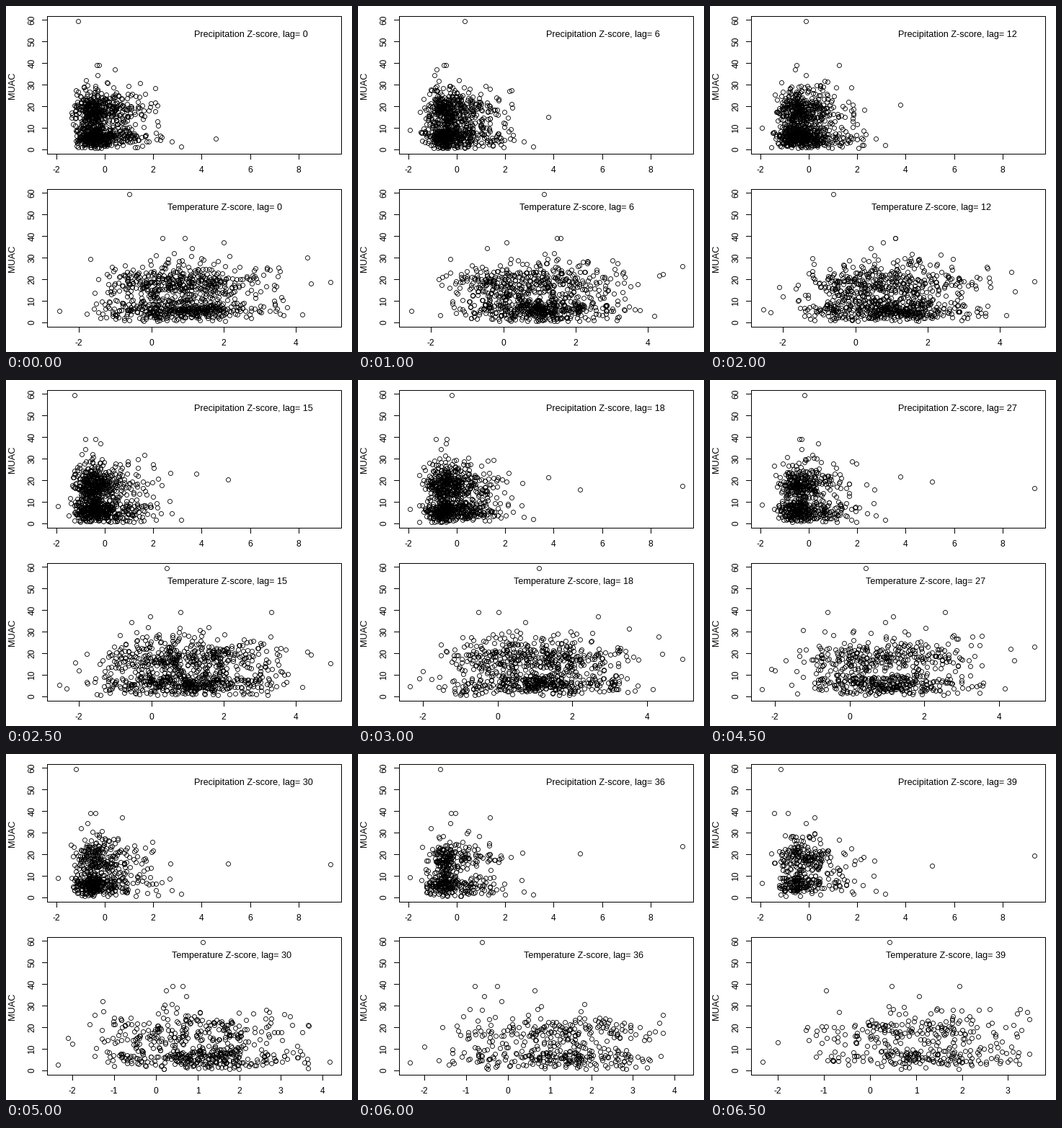
These frames come from a looping animation (480x480 px, 7000 ms). A matplotlib script:

```python
import numpy as np
import matplotlib.pyplot as plt
from matplotlib.animation import FuncAnimation

plt.rcParams["font.family"] = "Liberation Sans"
PX = 0.9                      # points per pixel at 80 dpi
LEFT, RIGHT, TOP, BOTTOM = 57, 465, 14, 205
INNER = (72.4, 450.2)         # pixel span of the x data range
SHIFT = 240                   # distance between the two panels
HIGH = [59.5, 39, 39, 37, 34.5]

# Isolated z-scores: x, typical MUAC, first lag, last lag
RAIN_FAR = [(-1.93, 9, 6, 39), (2.68, 8, 15, 39), (2.7, 19, 15, 39),
            (2.76, 4, 0, 39), (3.17, 1.5, 0, 39), (3.77, 20, 6, 27),
            (4.57, 5, 0, 3), (5.1, 19, 15, 39), (9.3, 18, 18, 39)]
TEMP_FAR = [(-2.55, 5, 0, 15), (-2.34, 4, 12, 39), (-2.1, 13, 12, 33),
            (-2.0, 12, 12, 39), (4.17, 4, 0, 33), (4.32, 24, 0, 27),
            (4.42, 19, 0, 27), (4.95, 20, 0, 27)]

fig = plt.figure(figsize=(6, 6), dpi=80, facecolor="white")
ax = fig.add_axes([0, 0, 1, 1])


def temp_range(lag):
    if lag < 18:
        return -2.59, 4.95
    if lag < 30:
        return -2.35, 4.95
    return (-2.35, 4.18) if lag < 39 else (-2.35, 3.57)


def to_x(v, lims):
    lo, hi = lims
    x = INNER[0] + (np.asarray(v) - lo) / (hi - lo) * (INNER[1] - INNER[0])
    return np.floor(x)


def to_y(v):
    return np.floor(199.4 - 2.993 * np.asarray(v))


def refill(rng, x, lo, hi, a, b):
    """Redraw values outside lo..hi evenly between a and b."""
    return np.where((x < lo) | (x > hi), rng.uniform(a, b, len(x)), x)


def muac(rng, n):
    kind = rng.random(n)
    low = 0.5 + np.abs(rng.normal(5.4, 2.7, n))
    mid = rng.normal(17.5, 3.6, n)
    wide = rng.triangular(9, 18, 33, n)
    return np.where(kind < 0.53, low, np.where(kind < 0.8, mid, wide))


def rain(rng, n):
    core = rng.normal(-0.5, 0.27, n)
    skew = -1.75 + rng.gamma(4.5, 0.4, n)
    x = np.where(rng.random(n) < 0.3, core, skew)
    return refill(rng, x, -1.6, 2.4, -0.9, 1.4)


def temp(rng, y, lag):
    n = len(y)
    core = np.where(y < 10, rng.normal(1.05, 0.45, n), rng.normal(0.85, 0.7, n))
    cool = rng.normal(-0.25, 0.65, n)
    warm = rng.triangular(1.2, 1.7, 4, n)
    kind = rng.random(n)
    cut = 0.8 - 0.003 * lag
    x = np.where(kind < 0.47, core, np.where(kind < cut, cool, warm))
    return refill(rng, x, -1.8, 3.8 if lag < 39 else 3.5, -1.0, 2.0)


def season(lag):
    """Temperature of the highest reading follows the yearly cycle."""
    t = 2 * np.pi * lag / 12
    return 0.25 - 0.87 * np.cos(t) + 0.18 * np.sin(t)


def line(xs, ys):
    ax.plot(xs, ys, color="black", lw=PX, solid_capstyle="projecting")


def label(x, y, s, size=12, **kw):
    ax.text(x, y, s, fontsize=size * PX, color="black", **kw)


def panel(dy, lims, ticks, title, title_x):
    line([LEFT, RIGHT, RIGHT, LEFT, LEFT],
         [TOP + dy, TOP + dy, BOTTOM + dy, BOTTOM + dy, TOP + dy])
    for v in ticks:
        x = to_x(v, lims)
        line([x, x], [BOTTOM + dy, BOTTOM + dy + 7])
        label(x, 231 + dy, str(v), ha="center", va="baseline")
    for v in range(0, 61, 10):
        y = to_y(v) + dy
        line([LEFT - 7, LEFT], [y, y])
        label(36.5, y, str(v), rotation=90, ha="center", va="center")
    label(8.7, 110 + dy, "MUAC", 12.7, rotation=90, ha="center", va="center")
    label(title_x, 43.3 + dy, title, 12.6, ha="left", va="baseline")


def circles(x, y):
    ax.scatter(x + 0.5, y + 0.5, s=(6 * PX) ** 2, facecolors="none",
               edgecolors="black", linewidths=0.85 * PX)


def cloud(rng, lag, dy, lims, x, y, high_x, far):
    """Bulk points, the highest readings and the isolated z-scores."""
    shown = np.array([(fx, fy) for fx, fy, a, b in far if a <= lag <= b])
    far_y = shown[:, 1] * (1 + 0.15 * rng.normal(size=len(shown)))
    all_x = np.concatenate([x, high_x, shown[:, 0]])
    all_y = np.concatenate([y, HIGH, far_y])
    circles(to_x(all_x, lims), to_y(all_y) + dy)


def update(i):
    lag = 3 * i
    rng = np.random.default_rng(100 + lag)
    ax.clear()
    ax.set(xlim=(0, 480), ylim=(480, 0))
    ax.axis("off")

    y = muac(rng, int(860 - 20.5 * max(0, lag - 15)))
    lims = (-1.93, 9.3)
    x = rain(rng, len(y))
    panel(0, lims, range(-2, 9, 2), f"Precipitation Z-score, lag= {lag}", 261)
    cloud(rng, lag, 0, lims, x, y, rng.choice(x, len(HIGH)), RAIN_FAR)

    lims = temp_range(lag)
    ticks = range(-2, int(lims[1]) + 1, 2 if lag < 30 else 1)
    x = temp(rng, y, lag)
    high_x = np.append(season(lag), rng.choice(x, len(HIGH) - 1))
    panel(SHIFT, lims, ticks, f"Temperature Z-score, lag= {lag}",
          to_x(0, lims) + 22.5)
    cloud(rng, lag, SHIFT, lims, x, y, high_x, TEMP_FAR)
    return ax.get_children()


anim = FuncAnimation(fig, update, frames=14, interval=500, repeat=True,
                     init_func=lambda: [], blit=False)
plt.show()
```
